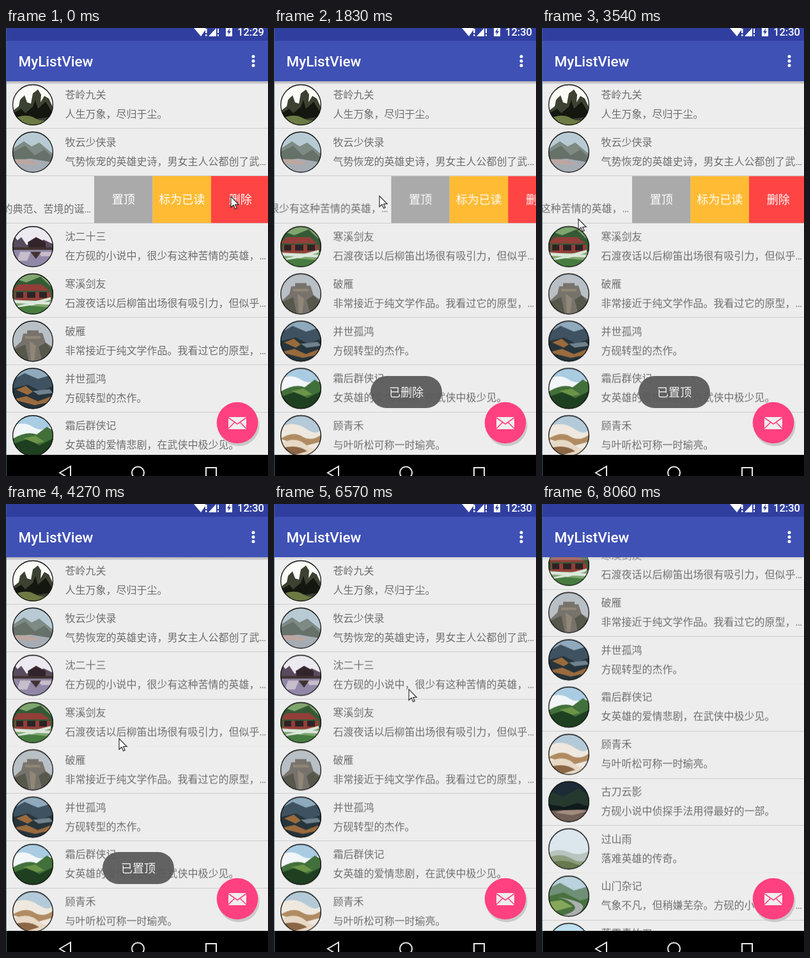
An HTML page for the animation above (8140 ms loop, 410 by 699 pixels).

```html
<!DOCTYPE html>
<html lang="zh-CN">
<head>
<meta charset="utf-8">
<title>MyListView</title>
<style>
html, body { margin: 0; width: 100%; height: 100%; overflow: hidden; background: #ededed; }
svg { display: block; width: 100vw; height: 100vh; }
text { font-family: Roboto, "Noto Sans CJK SC", "Noto Sans CJK", sans-serif; }
.row text { font-size: 16px; fill: #6e6e6e; }
.menu text { font-size: 18px; fill: #fff; text-anchor: middle; }
.toast text { font-size: 18px; fill: #f4f4f4; text-anchor: middle; }
.bar text { fill: #fff; font-weight: 500; }

.scroll, .rest, .removed, .swipe, .cursor, .toast, .glow, .clock, .shade, .line0, .line2 {
  animation: 8140ms linear infinite;
}
.scroll { animation-name: scroll; }
.rest { animation-name: rest; }
.removed { animation-name: removed; }
.swipe { animation-name: swipe; }
.cursor { animation-name: cursor; }
.toast { opacity: 0; }
.deleted { animation-name: deleted; }
.pinned { animation-name: pinned; }
.glow { animation-name: glow; transform-origin: 205px 83px; }
.before { animation-name: removedClock; }
.after { animation-name: shownClock; }
.shade { animation-name: shade; }
.line0 { animation-name: line0; }
.line2 { animation-name: line2; }

@keyframes scroll {
  0%, 82.9% { transform: translateY(0); }
  87% { transform: translateY(-195px); animation-timing-function: ease-out; }
  88.7%, 100% { transform: translateY(-245.5px); }
}
@keyframes rest {
  0%, 6.88% { transform: translateY(73.75px); }
  6.89%, 100% { transform: translateY(0); }
}
@keyframes removed {
  0%, 6.88% { opacity: 1; }
  6.89%, 100% { opacity: 0; }
}
@keyframes swipe {
  0%, 15.36% { transform: translateX(0); }
  21.5% { transform: translateX(-167px); animation-timing-function: ease-out; }
  23.96%, 29.48% { transform: translateX(-274px); animation-timing-function: ease-out; }
  32.43%, 37.84% { transform: translateX(0); }
  42.75% { transform: translateX(-215px); }
  43.49% { transform: translateX(-271px); }
  44.96%, 48.16% { transform: translateX(-274px); animation-timing-function: ease-out; }
  51.35%, 100% { transform: translateX(0); }
}
@keyframes cursor {
  0%, .36% { transform: translate(352px, 263px); }
  .37%, 5.65% { transform: translate(362px, 264px); }
  12.53%, 15% { transform: translate(332px, 260px); }
  21.5%, 27% { transform: translate(165px, 262px); }
  29.48%, 33.05% { transform: translate(195px, 262px); }
  36.1%, 37.2% { transform: translate(300px, 264px); }
  43%, 48% { transform: translate(57px, 298px); }
  52.4%, 52.6% { transform: translate(177px, 366px); }
  58%, 58.4% { transform: translate(205px, 210px); }
  65.1% { transform: translate(210px, 400px); }
  68.3%, 68.7% { transform: translate(208px, 250px); }
  73.7% { transform: translate(206px, 453px); }
  78.5% { transform: translate(212px, 330px); }
  80.7% { transform: translate(211px, 287px); }
  82.9% { transform: translate(215px, 480px); }
  87%, 89% { transform: translate(228px, 285px); }
  96.7%, 100% { transform: translate(20px, 705px); }
}
@keyframes deleted {
  0%, 7.37% { opacity: 0; }
  10.44%, 33.78% { opacity: .95; }
  36.1%, 100% { opacity: 0; }
}
@keyframes pinned {
  0%, 34.4% { opacity: 0; }
  37.2%, 60.2% { opacity: .95; }
  63.9%, 100% { opacity: 0; }
}
@keyframes glow {
  0%, 59% { opacity: 0; transform: scaleY(0); }
  65.1% { opacity: .14; transform: scaleY(1); }
  68%, 69.3% { opacity: 0; transform: scaleY(0); }
  73.7% { opacity: .14; transform: scaleY(1); }
  78.5%, 100% { opacity: 0; transform: scaleY(0); }
}
@keyframes removedClock {
  0%, 8.6% { opacity: 1; }
  8.61%, 100% { opacity: 0; }
}
@keyframes shownClock {
  0%, 8.6% { opacity: 0; }
  8.61%, 100% { opacity: 1; }
}
@keyframes shade {
  0%, 58.3% { opacity: 1; }
  58.4%, 100% { opacity: .35; }
}
@keyframes line0 {
  0%, 82.9% { opacity: .12; }
  83%, 100% { opacity: 1; }
}
@keyframes line2 {
  0%, 88.6% { opacity: 1; }
  88.7%, 100% { opacity: .2; }
}
</style>
</head>
<body>
<svg viewBox="0 0 410 699" preserveAspectRatio="none">
  <defs>
    <clipPath id="disc"><circle r="32"/></clipPath>
    <linearGradient id="fade" x2="0" y2="1">
      <stop stop-color="#b4b4b8"/><stop offset=".7" stop-color="#cfcfd1"/>
      <stop offset="1" stop-color="#ededed" stop-opacity="0"/>
    </linearGradient>
  </defs>
  <rect width="410" height="699" fill="#ededed"/>
  <g class="scroll">
    <g id="lines" fill="#cdcdcd"></g>
    <g id="rows"></g>
  </g>
  <ellipse class="glow" cx="205" cy="83" rx="260" ry="75" fill="#3f51b5"/>

  <g class="toast deleted"><rect x="151" y="543" width="112" height="50" rx="25" fill="#5b5b5b"/><text x="207" y="575">已删除</text></g>
  <g class="toast pinned"><rect x="151" y="543" width="112" height="50" rx="25" fill="#5b5b5b"/><text x="207" y="575">已置顶</text></g>

  <circle cx="364" cy="620" r="32.5" fill="#c9c9c9"/>
  <circle cx="362" cy="616" r="32.3" fill="#ff4081"/>
  <rect x="348" y="607" width="28" height="19" fill="#eee"/>
  <path d="M348 608L362 618L376 608M348 625L357.500 615.500M376 625L366.500 615.500" fill="none" stroke="#ff4081" stroke-width="1.6"/>

  <rect class="shade" y="83" width="410" height="5" fill="url(#fade)"/>
  <g class="bar">
    <rect width="410" height="20" fill="#303f9f"/>
    <rect y="20" width="410" height="63" fill="#3f51b5"/>
    <text x="19.500" y="60" font-size="22.500">MyListView</text>
    <g fill="#fff">
      <circle cx="387" cy="44.500" r="2.500"/><circle cx="387" cy="51.500" r="2.500"/><circle cx="387" cy="58.500" r="2.500"/>
      <path d="M294 0H312V3L305 13ZM312 1H314.500V8H312ZM312 10H314.500V12.500H312ZM317 13L329 0V13ZM331 1H333V8H331ZM331 10H333V12.500H331ZM344 0H354V13H344Z"/>
    </g>
    <path d="M350 0L346 7H348.500L348 11L352 5H349.500Z" fill="#303f9f"/>
    <g font-size="16.500">
      <text class="clock before" x="362" y="12">12:29</text>
      <text class="clock after" x="362" y="12">12:30</text>
    </g>
  </g>
  <rect y="666" width="410" height="33" fill="#000"/>
  <g fill="none" stroke="#e8e8e8" stroke-width="2">
    <path d="M84 694L101 684V704Z"/><circle cx="206.500" cy="694" r="9.500"/><rect x="313" y="686" width="16" height="16"/>
  </g>
  <rect width="1" height="699" fill="#417488" opacity=".8"/>
  <path class="cursor" d="M0 0V17L4 13.300L6.600 19.300L9.200 18.200L6.600 12.500H12.200Z" fill="#fff" stroke="#222" stroke-width="1.100"/>
</svg>
<script>
const PITCH = 73.75, TOP = 83;

// Each picture: backdrop colour, then [colour, path] layers in a box of ±32.
const rocks = ['#fbfcf8',
  ['#3c4232', 'M-32 10L-22 2L-20 -8L-13 -15L-9 -4L-3 -2L0 -18L8 -24L13 -16L12 -4L18 -14L25 -10L32 5V32H-32Z'],
  ['#14170f', 'M-32 14L-18 6L-12 13L0 3L4 -8L8 6L20 -5L32 14V18L4 22L-32 32Z'],
  ['#6c7a43', 'M-32 22Q-10 12 4 21T32 17V32H-32Z']];
const bay = ['#b8cbd4',
  ['#7e8a84', 'M-32 -5L-14 -17L-2 -9L10 -15L32 3V16H-32Z'],
  ['#66716a', 'M-32 0L-12 -10L3 5L18 -4L32 9V18H-32Z'],
  ['#a5acb3', 'M-32 14L-4 10L32 16V32H-32Z'],
  ['#bba7a2', 'M-32 11H-8L12 18L-5 20L-32 17Z']];
const lake = ['#ede9f1',
  ['#584b5d', 'M-32 -20L-24 -10L-18 -15L-10 -3L8 -5L17 -11L32 -4V7H-32Z'],
  ['#33242c', 'M-8 -7L5 -15L20 -7V6H-6Z'],
  ['#9188a8', 'M-32 4H32V32H-32Z'],
  ['#c7bdcb', 'M-20 8H-3L-9 22H-25ZM9 8H32V15H13Z'],
  ['#40332f', 'M-32 1H32V5H-32ZM-4 8L5 19L13 8ZM-32 18L-12 32H-32Z']];
const lodge = ['#7fa66f',
  ['#345a35', 'M-32 -25L-10 -18L12 -27L32 -8V8H-32Z'],
  ['#933e39', 'M-32 -5L-22 -15H13L27 -5ZM-28 -3H28V10H-28Z'],
  ['#2c2325', 'M-26 -3H-15V6H-26ZM-9 -3H4V6H-9ZM10 -3H22V6H10Z'],
  ['#dce8dc', 'M-32 9L32 13V17L-32 14ZM-25 19L28 5V9L-20 24Z'],
  ['#477c40', 'M-32 22L-5 18L32 22V32H-32Z']];
const fort = ['#b9c0c5',
  ['#77736c', 'M-32 13L-18 0L-15 -12H-9V-17H9V-13H15L20 2L32 10V32H-32Z'],
  ['#56584c', 'M-32 14L-12 5L-6 32H-32ZM9 9L20 2L32 15V32H15Z'],
  ['#918777', 'M-12 -8H12V-4H-12ZM-5 0L5 7L2 32H-3Z']];
const autumn = ['#8fa9bd',
  ['#3e5261', 'M-32 -13L-13 -24L8 -15L32 -22V12H-32Z'],
  ['#26343b', 'M-32 0L-8 -6L12 4L32 -4V32H-32Z'],
  ['#9a6b3d', 'M-26 2L-11 -4L0 5L-8 10ZM-32 17L-10 12L8 20L32 11V20L3 26Z'],
  ['#6f828d', 'M0 4L26 1L32 7L9 10Z']];
const hill = ['#a9cce2',
  ['#f2f6f8', 'M-32 -14Q-16 -24 0 -14T32 -17V12H-32Z'],
  ['#41703a', 'M-32 5Q-10 -8 6 -2L22 -14L32 -8V32H-32Z'],
  ['#1f4020', 'M-32 13L-8 5L10 15L32 4V32H-32Z'],
  ['#6b9449', 'M-15 4L4 0L18 9L6 12Z']];
const dunes = ['#b5cad8',
  ['#eee8df', 'M-32 -13Q-12 -24 8 -11T32 -13V32H-32Z'],
  ['#b08b62', 'M-32 5Q-13 -8 2 1T32 -2V9L6 16Z'],
  ['#e7d9c5', 'M-32 12Q-8 0 8 14T32 12V32H-32Z'],
  ['#8b6746', 'M-30 20Q-8 12 10 24L-9 30Z']];
const creek = ['#1c2b36',
  ['#26392e', 'M-32 -17L-8 -8L15 -21L32 -9V15H-32Z'],
  ['#715f56', 'M-32 13Q-5 3 32 11V32H-32Z'],
  ['#a28c7d', 'M-21 17Q2 8 29 15L5 21Z'],
  ['#10191c', 'M-32 4L-7 8L14 2L32 8V12L-32 14Z']];
const haze = ['#dce6ed',
  ['#b8c4bd', 'M-32 6Q-16 -2 0 5T32 3V32H-32Z'],
  ['#8d9c7c', 'M-32 14Q-14 5 4 15T32 13V32H-32Z'],
  ['#66794f', 'M-32 23Q-12 14 10 23T32 23V32H-32Z']];
const road = ['#b9d2dd',
  ['#6f9076', 'M-32 -12L-14 -21L8 -9L32 -16V32H-32Z'],
  ['#48713d', 'M-32 0L-8 -6L18 7L32 2V32H-32Z'],
  ['#aab0b0', 'M-18 32Q17 24 8 14T-20 1Q26 8 22 18T5 32Z'],
  ['#86a75b', 'M-32 9L-12 6L6 16L-24 24Z']];
const sky = ['#bfe0f0', ['#f3f8fa', 'M-32 -9Q-8 -22 32 -8V32H-32Z']];

const books = [
  ['苍岭九关', '人生万象，尽归于尘。', rocks],
  ['牧云少侠录', '气势恢宠的英雄史诗，男女主人公都创了武…', bay],
  ['沈二十三', '在方砚的小说中，很少有这种苦情的英雄，…', lake],
  ['寒溪剑友', '石渡夜话以后柳笛出场很有吸引力，但似乎…', lodge],
  ['破雁', '非常接近于纯文学作品。我看过它的原型，…', fort],
  ['并世孤鸿', '方砚转型的杰作。', autumn],
  ['霜后群侠记', '女英雄的爱情悲剧，在武侠中极少见。', hill],
  ['顾青禾', '与叶听松可称一时瑜亮。', dunes],
  ['古刀云影', '方砚小说中侦探手法用得最好的一部。', creek],
  ['过山雨', '落难英雄的传奇。', haze],
  ['山门杂记', '气象不凡，但稍嫌芜杂。方砚的小说里少写…', road],
  ['落霞青竹刀', '情节紧凑，一气呵成。', sky]
];
const removedBook = ['云台旧事', '写尽了江湖儿女恩怨情仇的典范、苦境的诞…', sky];
const actions = [['置顶', '#aaaaaa'], ['标为已读', '#ffbb33'], ['删除', '#ff4444']];

const avatar = ([back, ...layers]) => `<g transform="translate(42 36.9)">
  <g clip-path="url(#disc)"><circle r="32" fill="${back}"/>
  ${layers.map(([fill, d]) => `<path d="${d}" fill="${fill}"/>`).join('')}</g>
  <circle r="31.4" fill="none" stroke="#111" stroke-width="1.3"/></g>`;

const menu = () => `<g class="menu">${actions.map(([label, fill], i) => {
  const x = 412 + i * 91.5;
  return `<rect x="${x}" y=".5" width="91.6" height="73.25" fill="${fill}"/>
    <text x="${x + 45.75}" y="43.8">${label}</text>`;
}).join('')}</g>`;

const row = ([title, note, art], i, slide = '') => `<g class="row" transform="translate(0 ${TOP + PITCH * i})">
  <g ${slide}>${avatar(art)}<text x="92.5" y="27">${title}</text><text x="92.5" y="57">${note}</text>
  ${slide && menu()}</g></g>`;

const swipeRow = 2;
const list = books.map((book, i) => row(book, i, i === swipeRow ? 'class="swipe"' : ''));
document.getElementById('rows').innerHTML =
  list.slice(0, swipeRow).join('') +
  `<g class="removed">${row(removedBook, swipeRow, 'transform="translate(-274 0)"')}</g>` +
  `<g class="rest">${list.slice(swipeRow).join('')}</g>`;

document.getElementById('lines').innerHTML = books.slice(1).map((_, i) =>
  `<rect class="line${(i + 1) % 4}" y="${Math.floor(TOP + PITCH * (i + 1))}" width="410" height="1"/>`).join('');
</script>
</body>
</html>
```
